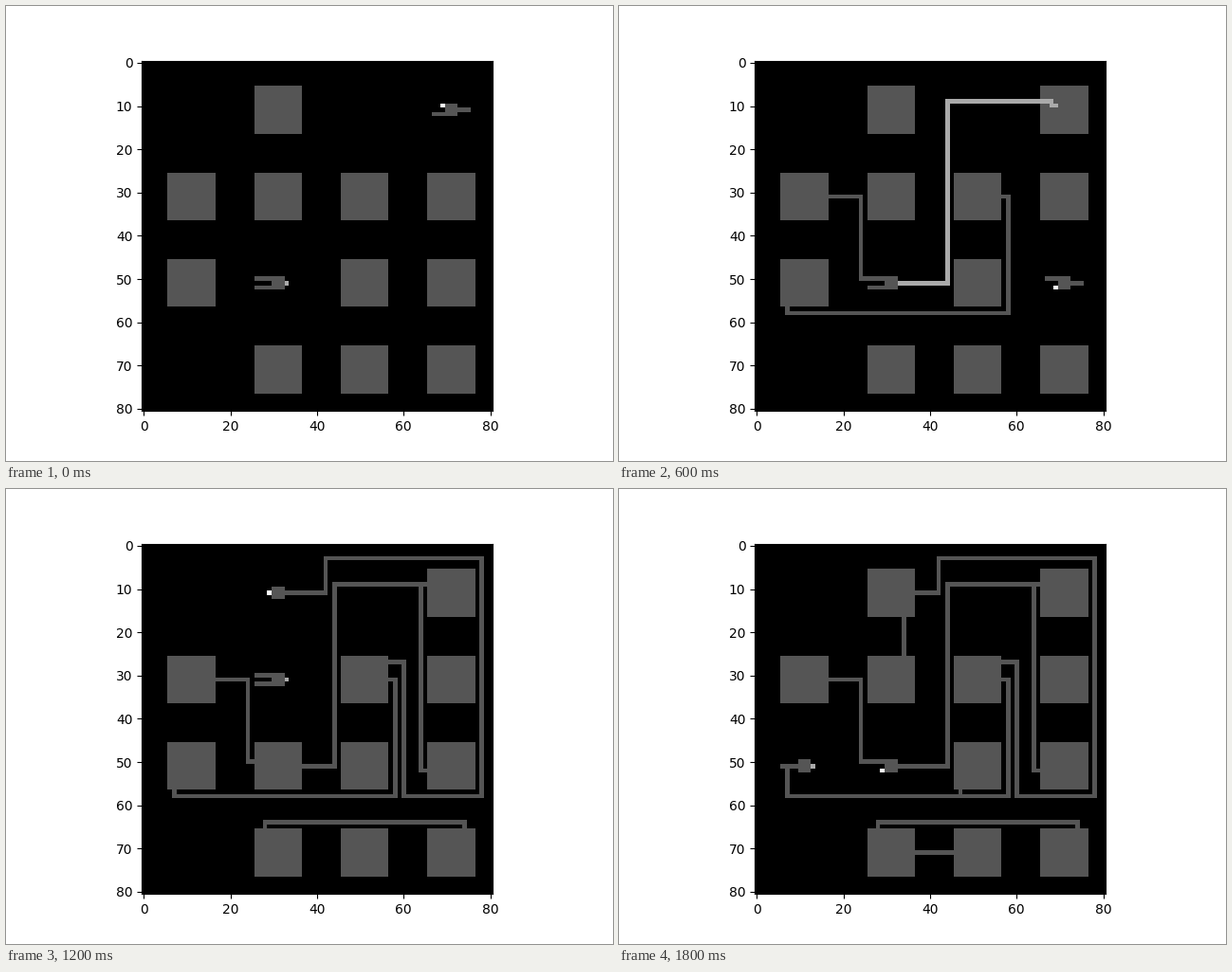
A matplotlib script for the animation above (2 s loop, 640 px wide and 480 px high).

```python
import numpy as np
import matplotlib.pyplot as plt
from matplotlib.animation import FuncAnimation

SIZE, BOX = 81, 11
DIM, LIT, HOT = 1, 2, 3

# Top-left cells (x, y) of the gates
GATES = [(6, 26), (6, 46),
         (26, 6), (26, 26), (26, 46), (26, 66),
         (46, 26), (46, 46), (46, 66),
         (66, 6), (66, 26), (66, 46), (66, 66)]
ONE_INPUT = {(6, 46), (26, 6), (46, 46), (46, 66)}

# Each step: driving gate, receiving gate, corners of the wire laid after it
STEPS = [
    ((26, 46), (66, 6), [(33, 51), (44, 51), (44, 9), (68, 9), (68, 10), (69, 10)]),
    ((46, 26), (6, 46), [(53, 31), (58, 31), (58, 58), (7, 58), (7, 51), (9, 51)]),
    ((6, 26), (26, 46), [(13, 31), (24, 31), (24, 50), (29, 50)]),
    ((26, 46), (66, 46), [(64, 9), (64, 52), (69, 52)]),
    ((26, 6), (46, 26), [(33, 11), (42, 11), (42, 3), (78, 3), (78, 58),
                         (60, 58), (60, 27), (48, 27), (48, 30), (49, 30)]),
    ((66, 66), (26, 66), [(73, 71), (74, 71), (74, 64), (28, 64), (28, 70), (29, 70)]),
    ((26, 26), (26, 6), [(33, 31), (34, 31), (34, 14), (28, 14), (28, 11), (29, 11)]),
    ((26, 66), (46, 66), [(33, 71), (49, 71)]),
    ((46, 26), (46, 46), [(47, 58), (47, 51), (49, 51)]),
    ((6, 46), (26, 46), [(13, 51), (18, 51), (18, 52), (29, 52)]),
]


def fill(grid, x, y, w, h, value):
    grid[y:y + h, x:x + w] = value


def draw_wire(grid, points, value):
    for (xa, ya), (xb, yb) in zip(points, points[1:]):
        fill(grid, min(xa, xb), min(ya, yb),
             abs(xa - xb) + 1, abs(ya - yb) + 1, value)


def input_rows(gate):
    y = gate[1]
    return [y + 5] if gate in ONE_INPUT else [y + 4, y + 6]


def draw_driver(grid, gate):
    x, y = gate
    for row in input_rows(gate):
        fill(grid, x, row, 4, 1, DIM)
    fill(grid, x + 4, y + 4, 3, 3, DIM)
    fill(grid, x + 7, y + 5, 1, 1, LIT)


def draw_receiver(grid, gate, pin_row):
    x, y = gate
    for row in input_rows(gate):
        if row != pin_row:
            fill(grid, x + 1, row, 3, 1, DIM)
    fill(grid, x + 4, y + 4, 3, 3, DIM)
    fill(grid, x + 7, y + 5, 3, 1, DIM)
    fill(grid, x + 3, pin_row, 1, 1, HOT)


def board(step):
    grid = np.zeros((SIZE, SIZE))
    driver, receiver, path = STEPS[step]
    laid = STEPS[:step]
    for _, _, points in laid:
        draw_wire(grid, points, DIM)
    for gate in GATES:
        if gate not in (driver, receiver):
            fill(grid, *gate, BOX, BOX, DIM)
    draw_driver(grid, driver)
    draw_receiver(grid, receiver, path[-1][1])
    # Wires already fed by the driver light up over the gates
    for start, _, points in laid:
        if start == driver:
            draw_wire(grid, points, LIT)
    return grid


fig, ax = plt.subplots(figsize=(6.4, 4.8), dpi=100)
image = ax.imshow(board(0), cmap="gray", vmin=0, vmax=3, interpolation="nearest")


def update(step):
    image.set_data(board(step))
    return [image]


anim = FuncAnimation(fig, update, frames=len(STEPS), interval=200,
                     repeat=True, repeat_delay=0)
plt.show()
```
